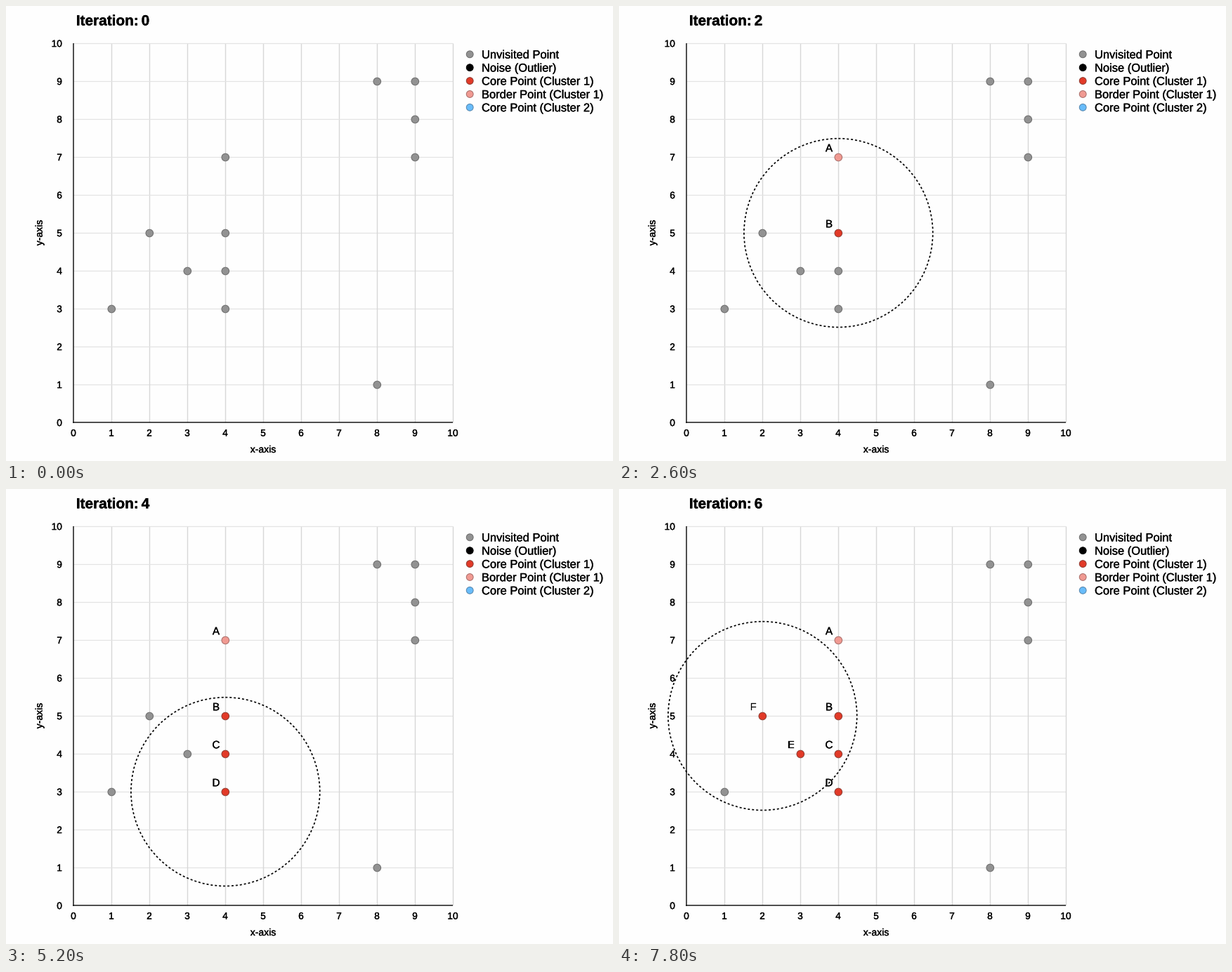
Animation of 864x648 px, one loop 8 s. Source, as a matplotlib script:

```python
import matplotlib.pyplot as plt
import numpy as np
from matplotlib.animation import FuncAnimation
from matplotlib.colors import to_rgb
from matplotlib.patches import Circle
from matplotlib.patheffects import withStroke

plt.rcParams["font.family"] = "Liberation Sans"
plt.rcParams["text.hinting"] = "none"

W, H, DPI = 864, 648, 72          # at 72 dpi one point is one pixel
LEFT, BOTTOM, CELL = 96, 593.3, 54
INTERVAL, FRAMES = 100, 80
START, PERIOD, FADE = 10, 13, 4   # first change, frames per iteration, per dissolve
RADIUS = 134.4

# fill and edge colours
GREY = ("#929292", "#6c6c6c")
BLACK = ("#000000", "#000000")
RED = ("#e23a28", "#8e3a30")
PINK = ("#f09a92", "#a86c68")
BLUE = ("#68bcfa", "#5686ac")

VISITED = [("A", 4, 7), ("B", 4, 5), ("C", 4, 4),
           ("D", 4, 3), ("E", 3, 4), ("F", 2, 5)]
UNVISITED = [(1, 3), (8, 1), (8, 9), (9, 9), (9, 8), (9, 7)]
LEGEND = [("Unvisited Point", GREY), ("Noise (Outlier)", BLACK),
          ("Core Point (Cluster 1)", RED), ("Border Point (Cluster 1)", PINK),
          ("Core Point (Cluster 2)", BLUE)]

fig = plt.figure(figsize=(W / DPI, H / DPI), dpi=DPI, facecolor="#fefefe")
ax = fig.add_axes([0, 0, 1, 1])
ax.set_xlim(0, W)
ax.set_ylim(H, 0)
ax.axis("off")


def to_px(x, y):
    return LEFT + CELL * x, BOTTOM - CELL * y


def line(xs, ys, color, width, z=1):
    ax.plot(xs, ys, color=color, lw=width, solid_capstyle="butt", zorder=z)


def text(x, y, s, size, **kw):
    # a hairline stroke gives the letters a slightly heavier weight
    stroke = [withStroke(linewidth=0.3, foreground="black")]
    return ax.text(x, y, s, fontsize=size, color="black", zorder=4,
                   path_effects=stroke, **kw)


def dot(x, y, colors, r):
    patch = Circle((x, y), r, fc=colors[0], ec=colors[1], lw=1, zorder=3)
    return ax.add_patch(patch)


def data_dot(x, y):
    px, py = to_px(x, y)
    return dot(px + 0.3, py + 0.2, GREY, 5.3)


def mix(a, b, t):
    return tuple((1 - t) * np.array(to_rgb(a)) + t * np.array(to_rgb(b)))


def draw_axes():
    right, top = to_px(10, 10)
    for i in range(11):
        x, y = to_px(i, i)
        if i:
            line([x, x], [top, BOTTOM], "#d7d7d7", 1.4)
            line([LEFT, right], [y, y], "#e3e3e3", 1.2)
        text(x, 612.6, str(i), 13.7, ha="center")
        text(79.9, y + 4.8, str(i), 13.7, ha="right")
    line([LEFT, LEFT], [top, BOTTOM + 0.7], "#151515", 1.5, 2)
    line([LEFT - 0.7, right], [BOTTOM, BOTTOM], "#151515", 1.5, 2)
    text(366, 636, "x-axis", 14, ha="center")
    text(54.6, 323, "y-axis", 14, ha="right", va="center", rotation=90)


def draw_legend():
    for i, (name, colors) in enumerate(LEGEND):
        y = 68.8 + 18.9 * i
        dot(660.2, y, colors, 4.9)
        text(677, y + 5.8, name, 16.5)


draw_axes()
draw_legend()
text(99.8, 27.5, "Iteration:", 20.8, weight="bold")
for x, y in UNVISITED:
    data_dot(x, y)

digits = [text(204.2, 27.5, str(i), 20.8, weight="bold", ha="right")
          for i in range(len(VISITED) + 1)]
dots, labels, rings = [], [], []
for name, x, y in VISITED:
    px, py = to_px(x, y)
    dots.append(data_dot(x, y))
    labels.append(text(px - 13, py - 8, name, 15.2, ha="center"))
    ring = Circle((px + 0.3, py - 0.2), RADIUS, fill=False, ec="black",
                  lw=1.7, ls=(0, (1.75, 1.75)), zorder=5)
    rings.append(ax.add_patch(ring))


def state_color(index, step):
    if step <= index:
        return GREY
    if index == 0:
        return BLACK if step == 1 else PINK
    return RED


def progress(frame):
    """Current iteration and how far its dissolve has gone."""
    if frame < START:
        return 0, 1.0
    step, since = divmod(frame - START, PERIOD)
    return step + 1, min(1.0, (since + 1) / FADE)


def fade(artist, alpha):
    artist.set_alpha(alpha)
    artist.set_visible(alpha > 0)


def update(frame):
    step, t = progress(frame)

    def weight(i):
        return t if i == step else 1 - t if i == step - 1 else 0

    for i, digit in enumerate(digits):
        fade(digit, weight(i))
    for i, (point, label, ring) in enumerate(zip(dots, labels, rings)):
        old, new = state_color(i, step - 1), state_color(i, step)
        point.set_facecolor(mix(old[0], new[0], t))
        point.set_edgecolor(mix(old[1], new[1], t))
        fade(label, 1 if i + 1 < step else weight(i + 1))
        fade(ring, weight(i + 1))
    return digits + dots + labels + rings


anim = FuncAnimation(fig, update, frames=FRAMES, interval=INTERVAL,
                     init_func=lambda: update(0), repeat=True, repeat_delay=0)
plt.show()
```
